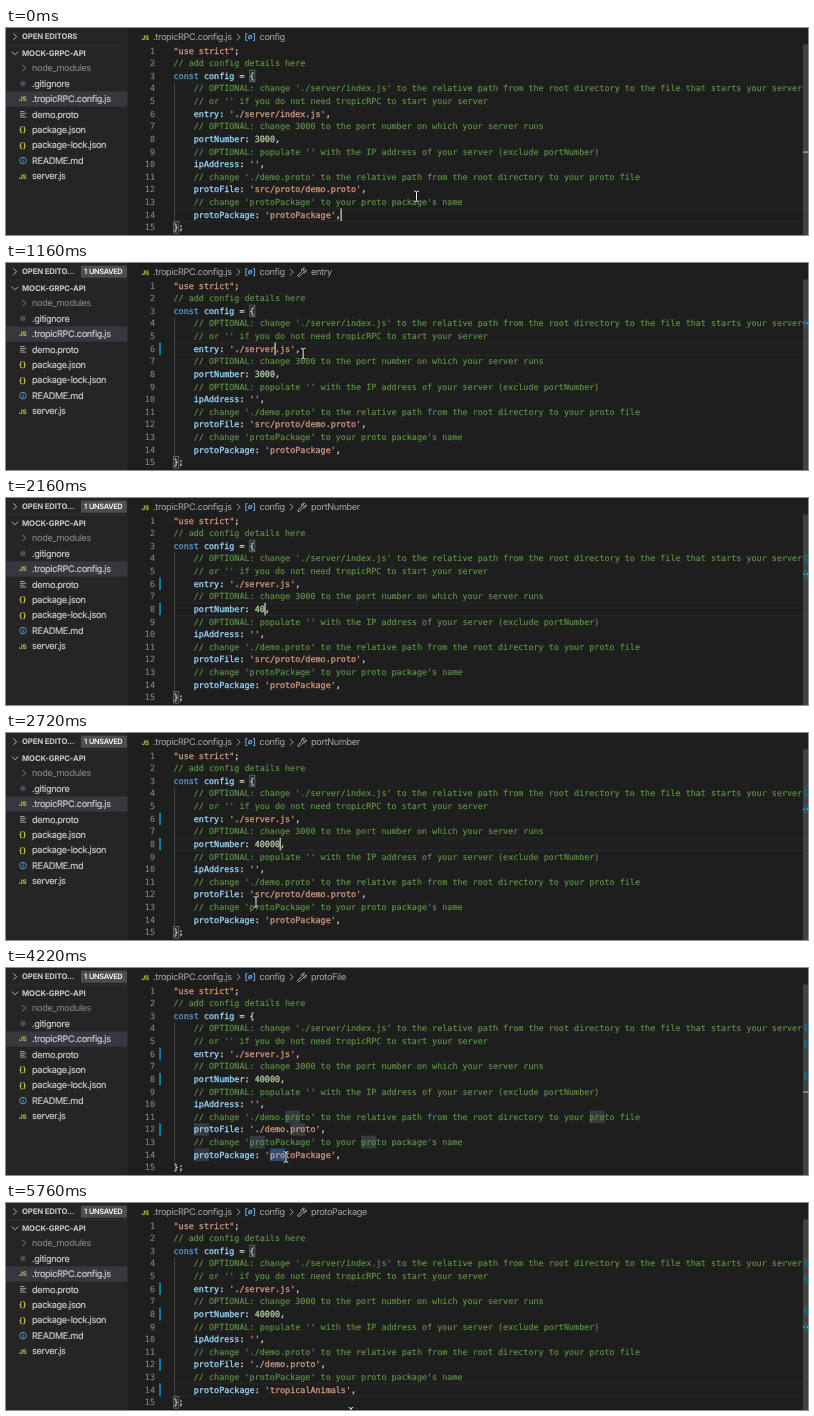
Write an HTML page that moves like this. It is 802 px wide and 207 px high and loops after 5780 ms.

```html
<!DOCTYPE html>
<html lang="en">
<head>
<meta charset="utf-8">
<title>Editing a config file</title>
<style>
html, body { margin: 0; width: 100%; height: 100%; overflow: hidden; background: #1e1e1e; }
svg { display: block; }
text { white-space: pre; text-rendering: geometricPrecision; }
.code { font: 8.43px "DejaVu Sans Mono", "Liberation Mono", monospace; fill: #d4d4d4; stroke: #d4d4d4; stroke-width: .28; }
.number { fill: #858585; stroke: #858585; stroke-width: .1; text-anchor: end; }
.ui { font: 9.13px Inter, "Liberation Sans", sans-serif; letter-spacing: -.036em; fill: #ccc; stroke: #ccc; stroke-width: .16; }
.head { font: 700 7.73px Inter, "Liberation Sans", sans-serif; letter-spacing: -.016em; fill: #ccc; }
.badge { font: 600 7.4px Inter, "Liberation Sans", sans-serif; letter-spacing: -.045em; word-spacing: .08em; fill: #fff; }
.js { font: 700 6.4px Inter, "Liberation Sans", sans-serif; letter-spacing: -.04em; fill: #cbcb41; }
.json { font: 700 7.4px "DejaVu Sans Mono", monospace; letter-spacing: -.1em; fill: #cbcb41; }
.crumb { fill: #a9a9a9; stroke: none; }
.dim { fill: #8c8c8c; stroke: none; }
</style>
</head>
<body>
<svg id="stage" width="802" height="207" viewBox="0 0 802 207"></svg>
<script>
const LOOP = 5780, X0 = 167.5, Y0 = 16.4, CW = 5.075, LH = 12.62, ROW = 15.42;
const stage = document.getElementById('stage');

const source = [
  '"use strict";',
  '// add config details here',
  'const config = {',
  "    // OPTIONAL: change './server/index.js' to the relative path from the root directory to the file that starts your server",
  "    // or '' if you do not need tropicRPC to start your server",
  "    entry: './server/index.js',",
  '    // OPTIONAL: change 3000 to the port number on which your server runs',
  '    portNumber: 3000,',
  "    // OPTIONAL: populate '' with the IP address of your server (exclude portNumber)",
  "    ipAddress: '',",
  "    // change './demo.proto' to the relative path from the root directory to your proto file",
  "    protoFile: 'src/proto/demo.proto',",
  "    // change 'protoPackage' to your proto package's name",
  "    protoPackage: 'protoPackage',",
  '};'
];

// Each edit drags a selection over `old`, then types `text` in its place.
const edits = [
  { row: 5, col: 20, old: '/index', text: '', drag: [580, 860], type: 1000, step: 1 },
  { row: 7, col: 16, old: '3000', text: '40000', drag: [1570, 1740], type: 2000, step: 100 },
  { row: 11, col: 16, old: 'src/proto', text: '.', drag: [2900, 3140], type: 3400, step: 1 },
  { row: 13, col: 19, old: 'protoPackage', text: 'tropicalAnimals', drag: [4130, 4450], type: 4560, step: 60 }
];
const crumbs = [[0, ''], [500, 'entry'], [1540, 'portNumber'], [3100, 'protoFile'], [4290, 'protoPackage']];
const mousePath = [
  [0, 410.5, 168.5], [60, 410.5, 168.5], [560, 270, 87], [700, 285, 87], [860, 303, 87], [1060, 303, 88],
  [1550, 250, 112], [1620, 260, 112], [1760, 273, 112], [2480, 273, 112], [2720, 250, 169],
  [2880, 249, 163], [3140, 295, 163], [3500, 295, 163], [4110, 264, 189], [4220, 280, 189],
  [4450, 326, 189], [5640, 336, 226], [5760, 345, 210], [5780, 345, 210]
];
const mouseHidden = [[2000, 2480], [3400, 3500], [4560, 5640]];

const lineTop = row => Y0 + row * LH;
const colX = col => X0 + col * CW;
const between = (t, [a, b]) => t >= a && t < b;

function add(tag, attrs = {}, text = '', parent = stage) {
  const node = document.createElementNS('http://www.w3.org/2000/svg', tag);
  for (const key in attrs) node.setAttribute(key, attrs[key]);
  node.textContent = text;
  return parent.appendChild(node);
}
const box = (x, y, width, height, fill, parent) => add('rect', { x, y, width, height, fill }, '', parent);
const label = (x, y, cls, text) => add('text', { x, y, class: cls }, text);
const path = (d, stroke, width = .9, parent) => add('path', { d, stroke, 'stroke-width': width, fill: 'none' }, '', parent);
const show = (node, on) => node.setAttribute('visibility', on ? 'visible' : 'hidden');
const chevron = (x, y, color) => path(`M${x - 1.6} ${y - 3.2}l3.2 3.2l-3.2 3.2`, color);

const palette = ['#619a48', '#d39a80', '#569cd6', '#b5cea8', '#9cdcfe'];
function paint(line) {
  const rule = /(\/\/.*)|('[^']*'|"[^"]*")|(\bconst\b)|(\d+)|(\w+(?=:)|config)|[^]/g;
  return line.replace(rule, (all, ...groups) => {
    const kind = groups.slice(0, 5).findIndex(Boolean);
    if (kind < 0) return all;
    const weight = kind === 0 ? .1 : .28;
    return `<tspan fill="${palette[kind]}" stroke="${palette[kind]}" stroke-width="${weight}">${all}</tspan>`;
  });
}

function buildSidebar() {
  box(0, 0, 121.5, 207, '#252526');
  box(0, 63.3, 121.5, ROW, '#37373d');
  box(0, 16.6, 121.5, .7, '#303031');
  chevron(9, 8.6, '#c5c5c5');
  path('M5.8 23.6l3.2 3.2l3.2 -3.2', '#c5c5c5');
  label(16, 27.7, 'head', 'MOCK-GRPC-API');
  chevron(18, 40.1, '#8c8c8c');
  const files = ['node_modules', '.gitignore', '.tropicRPC.config.js', 'demo.proto',
    'package.json', 'package-lock.json', 'README.md', 'server.js'];
  files.forEach((name, i) => {
    const y = 40.1 + i * ROW;
    label(26, y + 3.2, i === 0 ? 'ui dim' : 'ui', name);
    if (name.endsWith('.js')) label(13, y + 2.5, 'js', 'JS');
    if (name.endsWith('.json')) label(12.6, y + 2.6, 'json', '{}');
  });
  add('circle', { cx: 17, cy: 55.5, r: 2.7, fill: '#41535b' });
  [4.6, 6.3, 4.6, 6.3].forEach((w, i) => box(14, 83 + i * 1.9, w, .8, '#b8bbba'));
  add('circle', { cx: 17, cy: 132.6, r: 3.3, fill: 'none', stroke: '#519aba' });
  box(16.5, 132, 1, 2.6, '#519aba');
  box(16.5, 130.4, 1, 1, '#519aba');
}

function buildCrumbs() {
  label(135.5, 11.6, 'js', 'JS');
  label(147, 12.3, 'ui crumb', '.tropicRPC.config.js');
  chevron(232.5, 9.1, '#a9a9a9');
  path('M241.4 5.6h-1.6v7h1.6M247 5.6h1.6v7h-1.6', '#75beff');
  add('circle', { cx: 244.2, cy: 9.1, r: 1.7, fill: 'none', stroke: '#75beff', 'stroke-width': .9 });
  path('M242.1 11.2l4.2 -4.2', '#75beff', .7);
  label(253.5, 12.3, 'ui crumb', 'config');
}

buildSidebar();
const openHead = label(16, 11.4, 'head', '');
const badge = add('g');
box(75, 2.7, 46, 12, '#4d4d4d', badge);
badge.append(label(78, 11.4, 'badge', '1 UNSAVED'));
buildCrumbs();

const crumb = add('g');
crumb.append(
  chevron(285.5, 9.1, '#a9a9a9'),
  path('M291.8 12.2l3.8 -3.8a2.5 2.5 0 0 1 3 -3.2l-1.4 1.5l.3 1.3l1.3 .3l1.4 -1.5a2.5 2.5 0 0 1 -3.2 3l-3.8 3.8q-1.5 .2 -1.4 -1.4z', '#c5c5c5', .8)
);
const crumbText = label(305, 12.3, 'ui crumb', '');
crumb.append(crumbText);

const lineBorder = path(`M168 .4H797M168 ${LH}H797`, '#2b2b2b', .9);
box(168, lineTop(3), 1, LH * 11, '#434343');
const marks = add('g');
const brackets = add('g');
[[15, 2], [0, 14]].forEach(([col, row]) => add('rect', {
  x: colX(col) + .2, y: lineTop(row) + .5, width: CW, height: LH - 1,
  fill: '#232a26', stroke: '#777', 'stroke-width': .7
}, '', brackets));

const shown = [];
const rows = source.map((line, i) => {
  const y = lineTop(i) + 9.2;
  label(149, y, 'code number', i + 1);
  return label(colX(line.search(/\S/)), y, 'code', '');
});

box(797, Y0, 5, 191, '#424242');
const overview = add('g');
const changes = edits.map(({ row }) => {
  const g = add('g');
  box(153, lineTop(row), 2, LH, '#0c7d9d', g);
  box(798.2, 16 + row * 8, 2.6, 8, '#1d6478', g);
  return g;
});

const bulb = add('g');
const bulbY = lineTop(13) + 5;
add('circle', { cx: 173, cy: bulbY, r: 3.3, fill: '#ffcc00' }, '', bulb);
box(171.5, bulbY + 2.6, 3, 1.6, '#ffcc00', bulb);
box(171.7, bulbY + 4.6, 2.6, .9, '#c5c5c5', bulb);

const caret = box(0, 0, 1.3, LH, '#c8c9c7');
const mouse = add('g');
const beam = 'M-2.3 -5.4Q0 -5.4 0 -4Q0 -5.4 2.3 -5.4M0 -4V4M-2.3 5.4Q0 5.4 0 4Q0 5.4 2.3 5.4';
path(beam, '#111', 2, mouse);
path(beam, '#f2f2f2', 1, mouse);

function mouseAt(t) {
  const i = Math.max(1, mousePath.findIndex(p => p[0] > t));
  const [a, b] = [mousePath[i - 1], mousePath[i]];
  let k = (t - a[0]) / (b[0] - a[0]);
  if (b[0] - a[0] > 200) k = k * k * (3 - 2 * k);
  return [a[1] + (b[1] - a[1]) * k, a[2] + (b[2] - a[2]) * k];
}

// Text, caret and selection at time t.
function stateAt(t) {
  const lines = [...source];
  const state = { lines, row: 13, col: 33, selected: '', start: 0, since: 0 };
  for (const e of edits) {
    if (t < e.drag[0]) break;
    state.row = e.row;
    state.start = e.col;
    const typing = t >= e.type;
    let count;
    if (typing) {
      count = Math.min(e.text.length, Math.floor((t - e.type) / e.step) + 1);
      lines[e.row] = lines[e.row].slice(0, e.col) + e.text.slice(0, count) +
        lines[e.row].slice(e.col + e.old.length);
      state.since = e.type + Math.max(0, count - 1) * e.step;
    } else {
      const k = Math.min(1, (t - e.drag[0]) / (e.drag[1] - e.drag[0]));
      count = Math.floor(e.old.length * k);
      state.since = t;
    }
    state.selected = typing ? '' : e.old.slice(0, count);
    state.col = e.col + count;
  }
  return state;
}

function drawMarks(s) {
  marks.replaceChildren();
  overview.replaceChildren();
  box(797, 16 + s.row * 8 + 3.4, 5, 1.4, '#a0a0a0', overview);
  if (!s.selected) return;
  const width = s.selected.length * CW;
  s.lines.forEach((line, row) => {
    for (let col = line.indexOf(s.selected); col >= 0; col = line.indexOf(s.selected, col + s.selected.length)) {
      const own = row === s.row && col === s.start;
      box(colX(col), lineTop(row), width, LH, own ? '#264f78' : '#353b41', marks);
    }
  });
}

let lastKey = '';
function render(t) {
  const s = stateAt(t);
  s.lines.forEach((line, i) => {
    if (shown[i] === line) return;
    shown[i] = line;
    rows[i].innerHTML = paint(line.trimStart());
  });
  const key = s.row + s.selected;
  if (key !== lastKey) {
    lastKey = key;
    drawMarks(s);
  }

  const idle = !s.selected;
  show(brackets, idle);
  show(lineBorder, idle);
  lineBorder.setAttribute('transform', `translate(0 ${lineTop(s.row)})`);
  show(caret, idle && Math.floor((t - s.since) / 350) % 2 === 0);
  caret.setAttribute('x', colX(s.col) - .5);
  caret.setAttribute('y', lineTop(s.row));

  edits.forEach((e, i) => show(changes[i], t >= e.type));
  const unsaved = t >= edits[0].type;
  show(badge, unsaved);
  openHead.textContent = unsaved ? 'OPEN EDITO...' : 'OPEN EDITORS';
  const name = crumbs.filter(c => c[0] <= t).pop()[1];
  crumbText.textContent = name;
  show(crumb, name !== '');
  show(bulb, between(t, [4930, 5100]));

  const [x, y] = mouseAt(t);
  mouse.setAttribute('transform', `translate(${x.toFixed(2)} ${y.toFixed(2)})`);
  show(mouse, !mouseHidden.some(span => between(t, span)));
}

const begin = performance.now();
function tick() {
  render((performance.now() - begin) % LOOP);
  requestAnimationFrame(tick);
}
tick();
</script>
</body>
</html>
```
